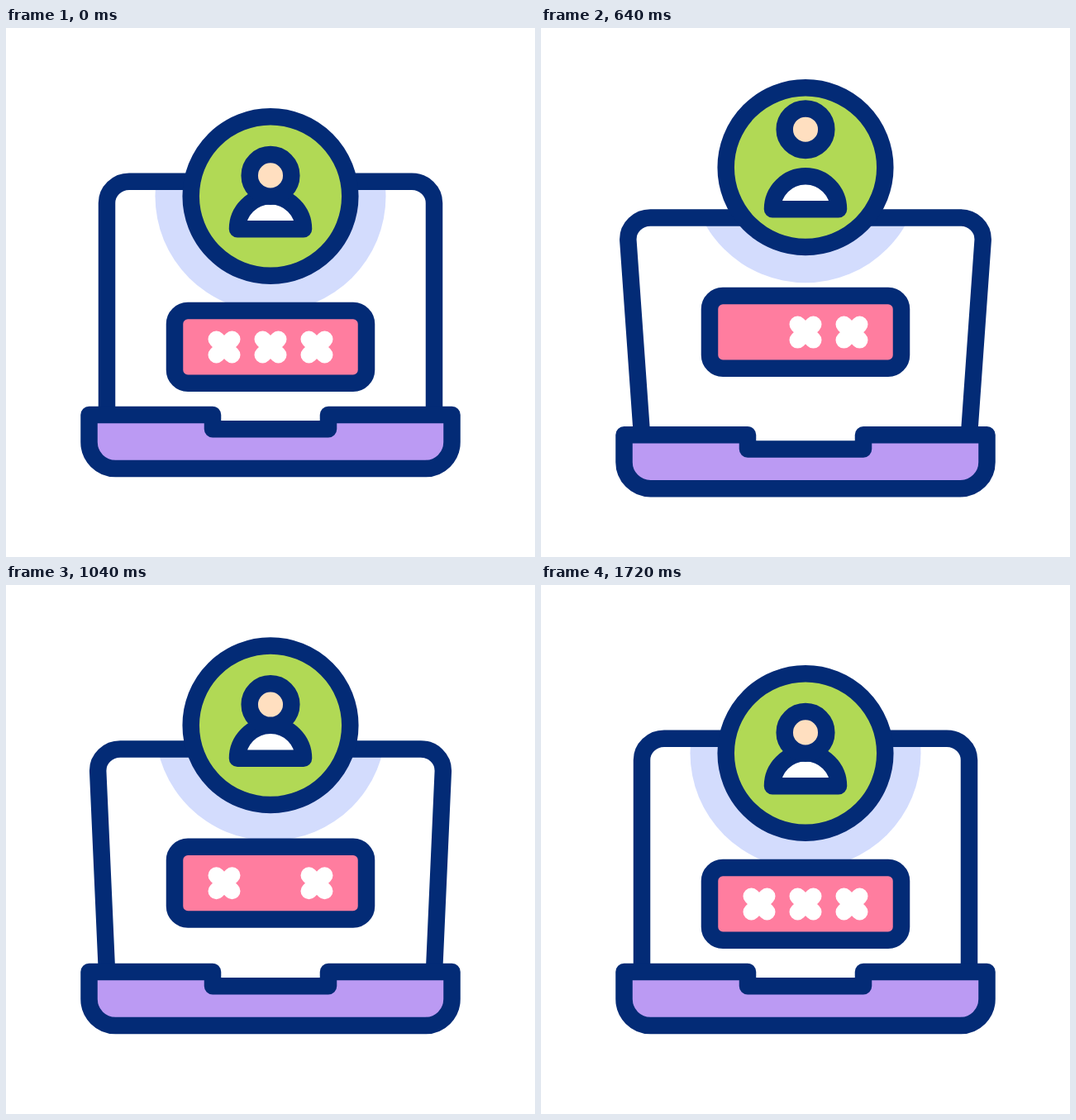
An HTML page for the animation above (2080 ms loop, 640 by 640 pixels).

```html
<!DOCTYPE html>
<html lang="en">
<head>
<meta charset="utf-8">
<title>Laptop login</title>
<style>
  html, body { margin: 0; width: 100%; height: 100%; overflow: hidden; background: #fff; }
  svg { display: block; width: 100%; height: 100%; }
  .line { stroke: #032b76; stroke-width: 20.5; stroke-linejoin: round; stroke-linecap: round; }
</style>
</head>
<body>
<svg viewBox="0 0 640 640">
  <defs>
    <clipPath id="below"><rect id="edge" width="640" height="640"/></clipPath>
  </defs>
  <g clip-path="url(#below)">
    <circle id="halo" cx="320" cy="203.5" r="139.5" fill="#d3dcfd"/>
  </g>
  <path id="screen" class="line" fill="none"/>
  <g id="base">
    <path class="line" fill="#bb9af3"
      d="M100.5 468H250V485.3H390V468H539.5V501A32 32 0 0 1 507.5 533H132.5A32 32 0 0 1 100.5 501Z"/>
  </g>
  <g id="field">
    <rect class="line" x="204" y="342" width="232" height="87.7" rx="16" fill="#ff7d9f"/>
    <g id="marks" stroke="#fff" stroke-width="20" stroke-linecap="round">
      <path d="M254.5 376.5l19 19m0-19l-19 19"/>
      <path d="M310.5 376.5l19 19m0-19l-19 19"/>
      <path d="M366.5 376.5l19 19m0-19l-19 19"/>
    </g>
  </g>
  <g id="badge">
    <circle class="line" cx="320" cy="203.5" r="96.3" fill="#b1d955"/>
    <path id="body" class="line" fill="#fff" d="M280 243.3A40 40 0 0 1 360 243.3Z"/>
    <circle id="head" class="line" cx="320" cy="178.4" r="25.3" fill="#ffdfc0"/>
  </g>
</svg>
<script>
const LOOP = 2080;
const $ = id => document.getElementById(id);
const marks = [...$('marks').children];

function ease(t, from, to) {
  const x = Math.min(1, Math.max(0, (t - from) / (to - from)));
  return x * x * x * (x * (6 * x - 15) + 10);
}

// Rises from a to b, falls back from c to d.
const pulse = (t, a, b, c, d) => ease(t, a, b) * (1 - ease(t, c, d));

const shift = (id, y) => $(id).setAttribute('transform', `translate(0 ${y.toFixed(2)})`);

function draw(t) {
  const drop = 32 * pulse(t, 0, 460, 442, 1000);
  const tilt = pulse(t, 165, 715, 809, 1353);
  const split = pulse(t, 60, 550, 514, 1097);
  const lift = -38.7 * pulse(t, 124, 810, 874, 1486);

  const top = 185.7 + drop + 20 * tilt;
  const left = 122 - 17 * tilt;
  const right = 640 - left;
  const foot = 468 + drop;
  $('screen').setAttribute('d',
    `M122 ${foot}L${left} ${top + 27}Q${left} ${top + 27} ${left} ${top + 26}` +
    `A27 26 0 0 1 ${left + 27} ${top}H${right - 27}` +
    `A27 26 0 0 1 ${right} ${top + 26}V${top + 27}L518 ${foot}`);
  $('edge').setAttribute('y', top);

  shift('base', drop);
  shift('halo', lift);
  shift('badge', lift);
  shift('head', -22.5 * split);
  shift('body', 11.7 * split);
  shift('field', -25.3 * pulse(t, 183, 927, 997, 1608));

  // Each mark blinks off in turn.
  marks.forEach((m, i) => {
    const off = 520 + 400 * i;
    m.setAttribute('visibility', t >= off && t < off + 400 ? 'hidden' : 'visible');
  });
}

const start = performance.now();
function tick() {
  draw((performance.now() - start) % LOOP);
  requestAnimationFrame(tick);
}
draw(0);
requestAnimationFrame(tick);
</script>
</body>
</html>
```
